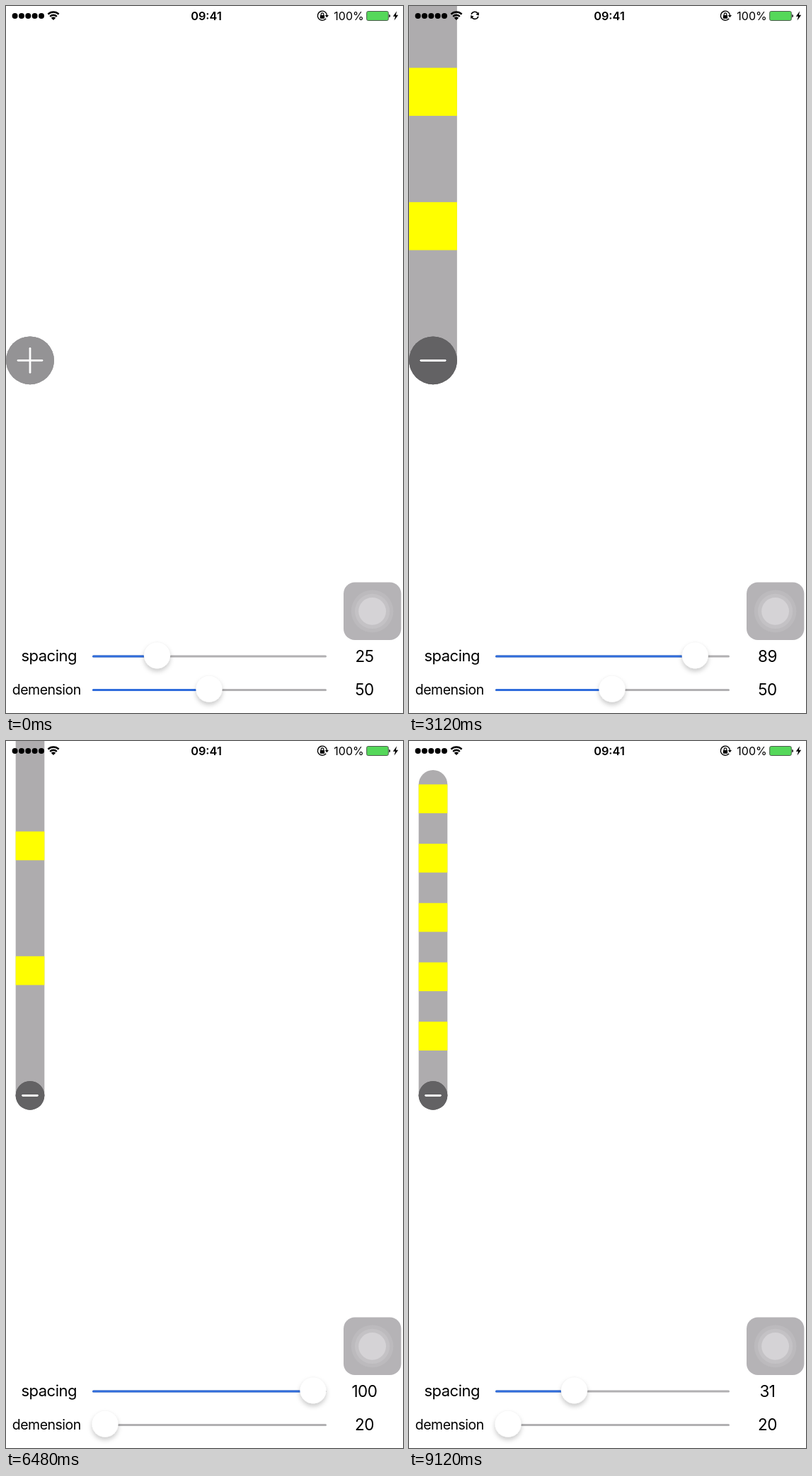
An HTML page for the animation above (9200 ms loop, 561 px wide and 998 px high).

```html
<!DOCTYPE html>
<html lang="en">
<head>
<meta charset="utf-8">
<title>Expanding menu</title>
<style>
  html, body { margin: 0; width: 100%; height: 100%; overflow: hidden; background: #fff; }
  svg { display: block; width: 100vw; height: 100vh; }
  text { font-family: Inter, Roboto, sans-serif; fill: #000; }
  .label { text-anchor: middle; letter-spacing: -.5px; }
  .track { stroke: #b1b0b2; stroke-width: 3; stroke-linecap: round; }
  .fill { stroke: #2f6cdc; stroke-width: 3; stroke-linecap: round; }
  .mark { stroke: #fff; stroke-width: 2.8; stroke-linecap: round; }
  .line { fill: none; stroke: #000; }
</style>
</head>
<body>
<svg id="stage" viewBox="0 0 561 998" xmlns="http://www.w3.org/2000/svg">
  <defs>
    <filter id="shadow" x="-50%" y="-50%" width="200%" height="200%">
      <feDropShadow dx="0" dy="4" stdDeviation="3.2" flood-color="#000" flood-opacity=".2"/>
    </filter>
  </defs>
  <rect width="561" height="998" fill="#fff"/>

  <g id="menu">
    <rect id="bar" fill="#aeacae"/>
    <g id="items" fill="#ff0"></g>
    <circle id="base" cx="34" cy="500.3"/>
    <circle id="face"/>
    <line id="minus" class="mark"/>
    <line id="cross" class="mark"/>
  </g>

  <g id="status">
    <g id="dots"></g>
    <g class="line" stroke-width="2.4">
      <path d="M59.4 11.7A10.8 10.8 0 0 1 74.6 11.7"/>
      <path d="M62.2 14.8A6.8 6.8 0 0 1 71.8 14.8"/>
    </g>
    <path d="M67 20L63.8 16.7A4.6 4.6 0 0 1 70.2 16.7Z"/>
    <g id="sync">
      <path class="line" stroke-width="1.6" d="M-1.5 4.9A5.2 5.2 0 0 1 -3 -4.2M1.5 -4.9A5.2 5.2 0 0 1 3 4.2"/>
      <path d="M-4.6 -5.8L.2 -5.8L-1.4 -1.4ZM4.6 5.8L-.2 5.8L1.4 1.4Z"/>
    </g>
    <text x="283" y="20" font-size="16.3" font-weight="600" text-anchor="middle">09:41</text>
    <path class="line" stroke-width="1.4" d="M452.2 17.8A6.6 6.6 0 1 1 453.6 13.4"/>
    <path d="M450.8 13L456 13L453.4 16.2Z"/>
    <rect x="443.9" y="13" width="6.2" height="4.8" rx=".6"/>
    <path class="line" stroke-width="1.2" d="M445.2 13.2V11.7A1.8 1.8 0 0 1 448.8 11.7V13.2"/>
    <text x="484.5" y="20" font-size="16" text-anchor="middle">100%</text>
    <rect x="509.7" y="7.5" width="30.6" height="13" rx="2" fill="#55d85a" stroke="#4c5a4d"/>
    <path d="M541.4 11.8A2.3 2.3 0 0 1 541.4 16.2Z"/>
    <path d="M552.2 7.2L546.8 14.8H550L548.6 20.6L554.2 12.8H550.9Z"/>
  </g>

  <rect x="477" y="813.6" width="81.4" height="81.4" rx="16" fill="#b5b3b6"/>
  <g id="touch"></g>
  <g id="controls"></g>
</svg>
<script>
const NS = 'http://www.w3.org/2000/svg';
const LOOP = 9200, STEP = 80, PT = 1.355, CX = 34, CY = 500.3, COUNT = 5;
const byId = id => document.getElementById(id);

function set(el, attrs) {
  for (const k in attrs) el.setAttribute(k, attrs[k]);
  return el;
}

function add(parent, tag, attrs) {
  return parent.appendChild(set(document.createElementNS(NS, tag), attrs));
}

const clamp = v => Math.max(0, Math.min(1, v));
const mix = (a, b, k) => a + (b - a) * k;

// Piecewise linear value through [time, value] pairs
function track(keys, t) {
  if (t <= keys[0][0]) return keys[0][1];
  for (let i = 1; i < keys.length; i++) {
    const [t0, a] = keys[i - 1], [t1, b] = keys[i];
    if (t <= t1) return mix(a, b, (t - t0) / (t1 - t0));
  }
  return keys[keys.length - 1][1];
}

const SPACING = [[900, 25], [1440, 13.3], [1800, 0], [2080, 0], [3120, 89.9], [3360, 100],
  [6760, 100], [7600, 49.3], [8160, 39], [8720, 33.5], [9120, 31.8]];
const DIMENSION = [[3920, 50], [5020, 80], [5280, 80], [6320, 20]];

for (let i = 0; i < 5; i++) add(byId('dots'), 'circle', { cx: 12.6 + i * 9.35, cy: 14, r: 4 });
for (const [r, fill] of [[29.8, '#bcbabd'], [24.6, '#c4c2c5'], [19.4, '#d5d3d6']])
  add(byId('touch'), 'circle', { cx: 517.6, cy: 854.4, r, fill });

function makeSlider(name, size, y, min, max) {
  const g = byId('controls');
  add(g, 'text', { class: 'label', x: name === 'spacing' ? 60.7 : 57.3, y: y + 6.5, 'font-size': size }).textContent = name;
  add(g, 'line', { class: 'track', x1: 123.5, x2: 451.5, y1: y, y2: y });
  const fill = add(g, 'line', { class: 'fill', x1: 123.5, y1: y, y2: y });
  const thumb = add(g, 'circle', { cy: y - 1.4, r: 18.7, fill: '#fff', stroke: '#000',
    'stroke-opacity': .05, 'stroke-width': .6, filter: 'url(#shadow)' });
  const value = add(g, 'text', { class: 'label', x: 506.5, y: y + 7.8, 'font-size': 22.5 });
  return v => {
    const x = mix(140, 434, (v - min) / (max - min));
    set(fill, { x2: x });
    set(thumb, { cx: x });
    value.textContent = Math.floor(v + 1e-6);
  };
}

const showSpacing = makeSlider('spacing', 22, 918, 0, 100);
const showDimension = makeSlider('demension', 19.5, 965.4, 20, 80);
const items = Array.from({ length: COUNT }, () => add(byId('items'), 'rect', {}));

const sizeAt = t => Math.max(30, track(DIMENSION, t)) * PT;

function drawMenu(t, gap) {
  const d = sizeAt(t), barSize = sizeAt(t - 90), faceSize = sizeAt(t - 130);
  const left = CX - d / 2, top = CY - d / 2;
  const p = clamp((t - 320) / 400), open = 1 - (1 - p) ** 3;
  const pitch = d + gap * PT;

  items.forEach((el, i) => set(el, {
    x: left, y: top - (i + 1) * pitch * open, width: d, height: d,
    visibility: open > 0 ? 'visible' : 'hidden'
  }));
  const barTop = top - (COUNT * pitch + d / 2) * open;
  set(byId('bar'), { x: left, y: barTop, width: barSize, height: top + barSize - barTop, rx: barSize / 2 });

  const shade = Math.round(mix(148, 99, open));
  set(byId('base'), { r: d / 2, fill: d - barSize > .1 ? '#8c8b8d' : `rgb(${shade},${shade - 1},${shade + 1})` });
  set(byId('face'), { cx: left + barSize / 2, cy: top + barSize / 2, r: barSize / 2,
    fill: `rgb(${shade},${shade - 1},${shade + 1})` });

  const x = left + faceSize / 2, y = top + faceSize / 2, half = d / 4;
  set(byId('minus'), { x1: x - half, x2: x + half, y1: y, y2: y });
  set(byId('cross'), { x1: x, x2: x, y1: y - half, y2: y + half,
    transform: `rotate(${90 * open} ${x} ${y})` });
}

function render(t) {
  const gap = track(SPACING, t);
  showSpacing(gap);
  showDimension(track(DIMENSION, t));
  drawMenu(t, gap);
  set(byId('sync'), {
    transform: `translate(93 13.3) rotate(${(t - 1440) / 1344 * 360})`,
    visibility: t >= 880 && t < 3680 ? 'visible' : 'hidden'
  });
}

function tick() {
  const t = performance.now() % LOOP;
  render(Math.floor(t / STEP) * STEP);
  requestAnimationFrame(tick);
}
tick();
</script>
</body>
</html>
```
